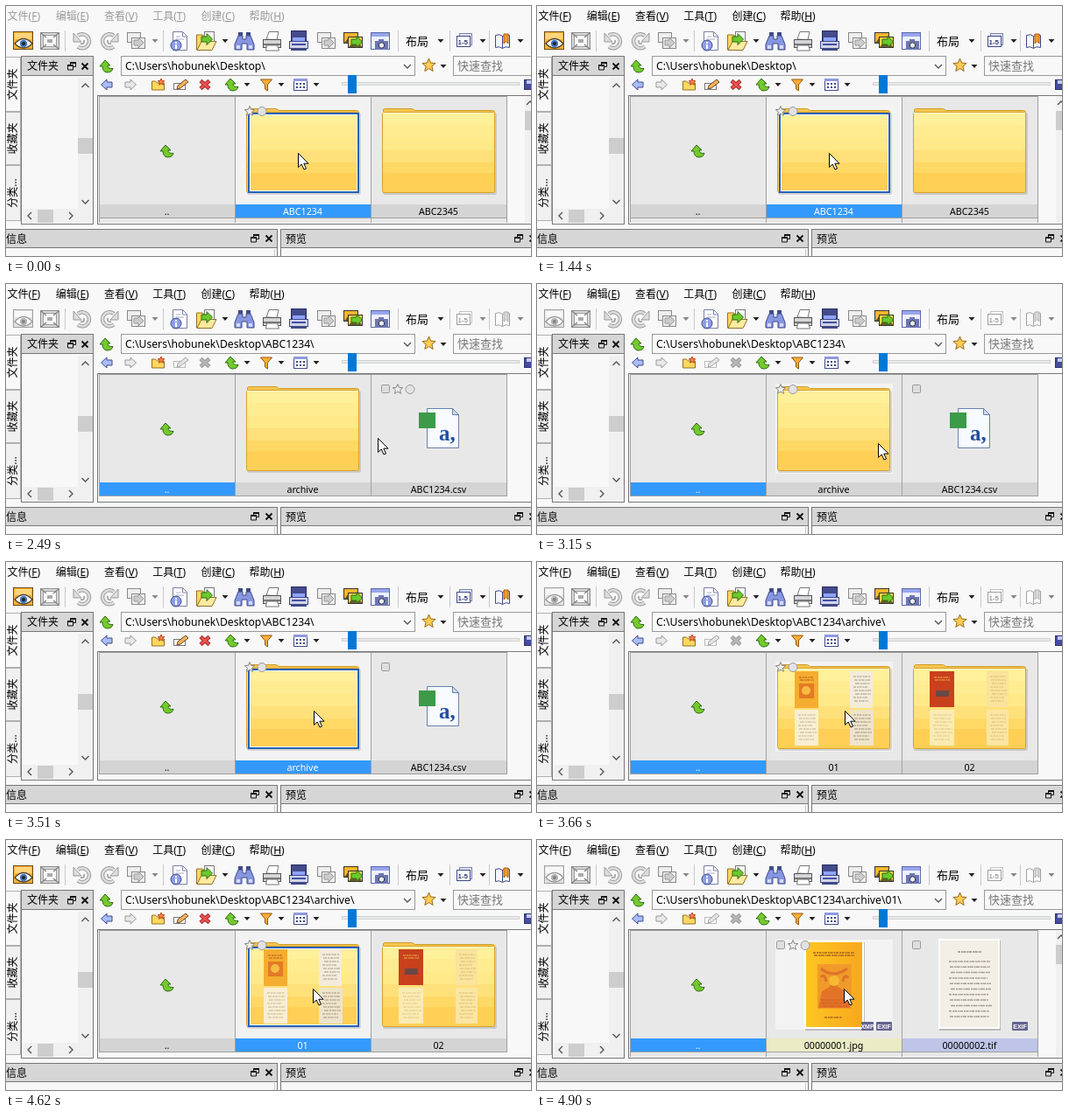
An HTML page for the animation above (6120 ms loop, 599x286 px).

```html
<!DOCTYPE html>
<html lang="zh">
<head>
<meta charset="utf-8">
<style>
html, body { margin: 0; width: 100%; height: 100%; overflow: hidden; background: #f8f8f8; }
svg { display: block; }
text { font: 12px "Noto Sans", "Noto Sans CJK SC", "Noto Sans CJK", sans-serif; white-space: pre; }
.path { font-size: 12.2px; }
.label { font-size: 10.7px; text-anchor: middle; }
.big { font-size: 13px; }
.badge { font: bold 7px "Liberation Sans", sans-serif; text-anchor: middle; fill: #fff; }
.off { filter: grayscale(1) brightness(1.15); opacity: .55; }
</style>
</head>
<body>
<svg id="stage" width="599" height="286" viewBox="0 0 599 286"></svg>
<script>
const LOOP = 6120;
const PALE = '#f8f8f8', HEADER = '#d6d6d6', BORDER = '#777', INK = '#3f4a86';
const stage = document.getElementById('stage');

const rect = (x, y, w, h, fill, more = '') =>
  `<rect x="${x}" y="${y}" width="${w}" height="${h}" fill="${fill}" ${more}/>`;
const box = (x, y, w, h, fill, line) =>
  rect(x + .5, y + .5, w - 1, h - 1, fill, `stroke="${line}"`);
const shape = (d, fill, line = 'none', width = 1) =>
  `<path d="${d}" fill="${fill}" stroke="${line}" stroke-width="${width}"/>`;
const stroke = (d, color, width = 1) => shape(d, 'none', color, width);
const dot = (x, y, r, fill, line = 'none', width = 1) =>
  `<circle cx="${x}" cy="${y}" r="${r}" fill="${fill}" stroke="${line}" stroke-width="${width}"/>`;
const text = (x, y, s, fill = '#000', cls = '') =>
  `<text x="${x}" y="${y}" fill="${fill}" class="${cls}">${s}</text>`;
const at = (x, y, s) => `<g transform="translate(${x} ${y})">${s}</g>`;
const when = (on, s) => on ? s : `<g class="off">${s}</g>`;

const drop = (x, y) => shape(`M${x - 3.5} ${y - 2}h7l-3.5 4z`, '#222');
const chevron = (x, y, turn, color = '#555') =>
  `<path d="M-4 -2L0 2L4 -2" transform="translate(${x} ${y}) rotate(${turn})" fill="none" stroke="${color}" stroke-width="1.4"/>`;
const restore = (x, y) =>
  stroke(`M${x - 1.5} ${y - 1.5}v-3h6v5h-3`, '#111') + stroke(`M${x - 4.5} ${y - 1}h6v5h-6z`, '#111') +
  stroke(`M${x - 2} ${y - 4}h7M${x - 5} ${y - 1}h7`, '#111', 2);
const close = (x, y) => stroke(`M${x - 3.5} ${y - 3.5}l7 7m0 -7l-7 7`, '#111', 1.8);
const separator = x => rect(x, 28, 1, 24, '#c8c8c8');
const upArrow = (x, y) => at(x, y,
  shape('M-8 0L-2 -7L4 -1H1Q1 3 7 2.500Q6 7 0 7Q-5 6 -5 0Z', '#74c92b', '#2b6b14'));
const star = (x, y, r, fill, line) => {
  const points = Array.from({ length: 10 }, (_, i) => {
    const a = i * Math.PI / 5, d = i % 2 ? r * .45 : r;
    return `${(x + d * Math.sin(a)).toFixed(2)} ${(y - d * Math.cos(a)).toFixed(2)}`;
  });
  return shape(`M${points.join('L')}Z`, fill, line);
};
const greenTip = (x, y) => shape(`M${x} ${y}h6v-3.500l6.500 6.500l-6.500 6.500v-3.500h-6z`, '#6bc92c', '#2d6a14');
const photo = (x, y, w, h, fill = '#f8b62a') =>
  box(x, y, w, h, fill, '#343434') + shape(`M${x + 1} ${y + h - 1}l5 -6l4 4l3 -3l${w - 14} 5z`, '#6d5a2a');
const exportPhoto = (x, y) => photo(x, y, 17, 13) + photo(x + 5, y + 5, 17, 13, '#ffd84c') + greenTip(x + 9, y + 8);
const outlinedPhoto = (x, y) => box(x, y, 16, 12, '#eee', '#888') + box(x + 5, y + 6, 16, 13, '#eee', '#888') +
  shape(`M${x + 8} ${y + 9}h5v-3l6 6l-6 6v-3h-5z`, '#ccc', '#999');

function toolbar(active) {
  const viewer = box(8, 29, 23, 21, '#f8b333', '#6e4a1a') + rect(10, 31, 19, 7, '#ffd47a') +
    shape('M10 43q10 -11 20 0q-10 10 -20 0z', '#fff', '#4f4030', 1.3) + dot(20, 43, 4.2, '#4173bd') + dot(20, 43, 2, '#222');
  const fullscreen = box(39, 30, 22, 20, '#d8d8d8', '#8c8c8c') + box(42, 33, 16, 14, '#fafafa', '#9b9b9b') +
    stroke('M40 31l6 5m14 -5l-6 5m-14 13l6 -5m14 5l-6 -5', '#858585', 1.5) + rect(47, 38, 6, 4, '#aaa');
  const rotate = (x, flip) => `<g transform="translate(${x} 40) scale(${flip} 1)">` +
    stroke('M-5 -6A8 8 0 1 1 -5 6.500', '#9a9a9a', 4.5) + stroke('M-5 -6A8 8 0 1 1 -5 6.500', '#ddd', 2.5) +
    shape('M-10 -9v10h9z', '#ddd', '#9a9a9a') + stroke('M-2 3q5 1 4 -4', '#aaa', 2) + '</g>';
  const info = shape('M190.500 29.500h11l5 5v16h-16z', '#fff', '#7980a5') + stroke('M201.500 30v5h5', '#7980a5') +
    stroke('M194 35h5m-5 3h9', '#a5aac6') + dot(194, 45, 6, '#8d9dea', INK) + rect(193, 44, 2, 5, '#fff') + rect(193, 41, 2, 2, '#fff');
  const open = box(226, 29, 12, 15, '#fff', '#777') + shape('M217.500 50V33h7l2 3h5v14z', '#ffd75e', '#91702a') +
    shape('M218 50.500l5 -10h17l-5 10z', '#ffeaa0', '#91702a') + greenTip(223, 35);
  const binoculars = shape('M265 34h5v4h4v-4h5l4 10v6h-8v-7h-6v7h-8v-6z', '#8796e2', INK) +
    rect(265, 30, 5, 4, INK) + rect(274, 30, 5, 4, INK) + rect(263, 45, 4, 4, '#d4daff') + rect(277, 45, 4, 4, '#d4daff');
  const printer = at(292, 29, shape('M5 9L8 .5h11l-2 9z', '#fff', '#777') + box(1, 9, 21, 10, '#d5d5da', '#555') +
    rect(2, 14, 19, 2, '#777') + shape('M5.500 16h12l2 6h-15z', '#fff', '#777'));
  const scanner = at(323, 28, box(2, 0, 18, 12, '#444b8c', '#282d60') + rect(4, 8, 14, 4, '#8fa4ff') +
    box(0, 12, 22, 9, '#d3d4e5', INK) + rect(3, 15, 16, 2, '#4150a8') + rect(2, 21, 18, 2, INK));
  const screenshot = box(416, 30, 22, 20, '#eef0ff', '#5b66a8') + rect(417, 31, 20, 4, '#98a6ed') +
    rect(421, 40, 15, 10, '#6c76b5') + rect(425, 38, 6, 3, '#6c76b5') + dot(428.5, 45, 3.2, '#e8edff', '#333');
  const rating = box(517, 31, 15, 14, '#e0e4f5', '#7b83a8') + box(514, 34, 16, 13, '#fff', INK) +
    `<text x="515.500" y="43.500" style="font:bold 8px 'Liberation Sans',sans-serif" fill="#333d70">1-5</text>`;
  const bookmark = shape('M558.500 33.500q5 -2 8 1q4 -3 8 -1v14q-5 -2 -8 1q-4 -3 -8 -1z', '#f4f5ff', INK) +
    stroke('M566.500 34v14', INK) + shape('M568 32h5v11l-2.500 -2.500l-2.500 2.500z', '#f79a28', '#a85c12');
  return when(active, viewer) + fullscreen + separator(67) + rotate(87, 1) + rotate(118, -1) +
    outlinedPhoto(138, 30) + when(false, drop(170, 40)) + separator(179) +
    info + open + drop(250, 40) + binoculars + printer + scanner + outlinedPhoto(355, 30) + exportPhoto(385, 30) + screenshot +
    separator(447) + text(456, 44.5, '布局', '#000', 'big') + drop(496, 40) + separator(506) +
    when(active, rating + drop(544, 40) + bookmark + drop(587, 40)) + separator(551);
}

function browserBar(path, active) {
  const arrow = (x, flip, fill, line) => `<g transform="translate(${x} 90) scale(${flip} 1)">` +
    shape('M-6.500 0L0 -6v3h6v6h-6v3z', fill, line) + '</g>';
  const newFolder = shape('M166.500 96V86h4l2 2h8v8z', '#ffd75e', '#91702a') + star(177, 87, 4, '#ff8548', '#b9411c');
  const rename = box(191, 88, 14, 8, '#fff', '#777') + shape('M195 95l1 -4l9 -7l3 3l-9 7z', '#f2b25a', '#6b4a2a');
  const remove = stroke('M222 85.500l10 9m0 -9l-10 9', '#9c2a2a', 4.5) + stroke('M222.500 86l9 8m0 -8l-9 8', '#f0504c', 2.5);
  const grid = box(328, 83, 16, 14, '#fff', INK) + rect(328, 83, 16, 3, '#8d98dc') +
    [0, 4].map(y => [0, 4, 8].map(x => rect(331 + x, 88 + y, 2, 2, INK)).join('')).join('');
  return upArrow(115, 69) + box(131, 57, 336, 23, PALE, '#999') + text(136, 73, path, '#000', 'path') +
    chevron(458, 69, 0) + star(482.5, 68, 8, '#ffcb52', '#96691c') + drop(499, 69) +
    box(510, 57, 95, 23, PALE, '#999') + text(515, 73, '快速查找', '#777', 'big') +
    arrow(115, 1, '#a9bdff', INK) + arrow(142, -1, '#e8e8e8', '#999') + newFolder + when(active, rename + remove) +
    upArrow(258, 90) + drop(275, 90) + shape('M290.500 84h13l-5 6v7l-3 -2v-5z', '#ffae35', '#93560e') + drop(314, 90) +
    grid + drop(354, 90) + box(383, 87, 203, 4, '#e7eaea', '#d2d2d2') + rect(390, 79, 10, 21, '#0078d7') +
    box(591, 84, 12, 12, '#464c9f', '#2c3170') + rect(594, 85, 5, 4, '#c5caf3');
}

function chrome() {
  const tab = (y, h, s, fill) => box(-1, y, 18, h, fill, '#b0b0b0') +
    `<text transform="translate(11.500 ${y + h / 2}) rotate(-90)" text-anchor="middle">${s}</text>`;
  const panel = (x, w, title) => box(x, 255, w, 40, PALE, BORDER) + rect(x + 1, 256, w - 2, 20, HEADER) +
    rect(x, 276, w, 1, BORDER) + text(Math.max(0, x + 6), 271, title);
  return rect(0, 0, 599, 286, PALE) +
    tab(58, 63, '文件夹', PALE) + tab(121, 61, '收藏夹', '#f0f0f0') + tab(182, 64, '分类...', '#f0f0f0') +
    box(17, 57, 83, 193, PALE, BORDER) + rect(18, 58, 81, 21, HEADER) + rect(18, 79, 81, 1, BORDER) +
    text(24, 73, '文件夹') + restore(75, 69) + close(90, 69) +
    rect(82, 82, 17, 150, '#f0f0f0') + rect(82, 151, 17, 18, '#cdcdcd') + chevron(90.5, 91, 180) + chevron(90.5, 224, 0) +
    rect(20, 232, 79, 16, '#f0f0f0') + rect(36, 233, 18, 15, '#cdcdcd') + chevron(27, 240, 90) + chevron(74, 240, -90) +
    box(104, 102, 500, 148, PALE, BORDER) + panel(-6, 316, '信息') + rect(306, 278, 1, 8, '#c5c5c5') +
    panel(313, 300, '预览') + restore(284, 266) + close(300, 266) + restore(585, 266) + close(601, 266);
}

function menu(color) {
  return ['文件F', '编辑E', '查看V', '工具T', '创建C', '帮助H'].map((s, i) =>
    text(1.6 + i * 55.2, 16, `${s.slice(0, 2)}(<tspan text-decoration="underline">${s[2]}</tspan>)`, color)).join('');
}

// Thumbnails are drawn relative to the left edge of their cell.
const rows = (x, y, w, n, gap, color, width = 1) => Array.from({ length: n }, (_, i) =>
  stroke(`M${x + i * 7 % 3} ${y + i * gap}h${w - i * 5 % 4}`, color, width)
    .replace('/>', ` stroke-dasharray="${3 + i % 3} 1 2 .5"/>`)).join('');

function folder() {
  const bands = [[121, 15, '#fff09a'], [136, 15, '#ffec90'], [151, 14, '#ffe988'],
    [165, 14, '#ffe07a'], [179, 12, '#ffd866'], [191, 22, '#ffcf56']];
  return rect(14, 122, 130, 94, '#000', 'opacity=".13" rx="2"') +
    shape('M14.500 122v-3q0 -1.500 2 -1.500h31l3 2h88q3 0 3 2v2z', '#f5c64e', '#cf9c28') +
    bands.map(([y, h, c]) => rect(14, y, 127, h, c)).join('') +
    rect(13.5, 121.5, 128, 92, 'none', 'rx="2" stroke="#d5a22d"') + rect(14, 122, 127, 1, '#fff7c6');
}
const page = (x, y, w, h, fill, ink) => rect(x, y, w, h, fill) + rows(x + 4, y + 6, w - 7, 8, 4, ink, .8);
const folder01 = () => folder() +
  rect(33, 125, 27, 42, '#f5ad30') + rect(38, 139, 17, 17, '#e47a25') + dot(46, 147, 5, '#f6bd45') +
  rows(38, 132, 17, 2, 3, '#b25b1a') + page(96, 125, 26, 42, '#f4ecda', '#8b8375') +
  page(33, 169, 27, 41, '#f8eed2', '#b1a58a') + page(96, 169, 27, 41, '#eee4ca', '#8b806c');
const folder02 = () => folder() +
  rect(32, 125, 28, 41, '#c9401c') + rows(37, 132, 18, 2, 3, '#eeb64a') + rect(39, 147, 15, 7, '#6a4844') +
  page(97, 125, 25, 41, '#fae39b', '#d4b36a') + page(32, 169, 28, 41, '#faebb4', '#d9bc77') +
  page(97, 169, 25, 41, '#fae6a2', '#d3b26a');
const upFolder = () => upArrow(78, 166);
const checkbox = () => rect(12.5, 115.5, 9, 9, '#dedede', 'rx="1" stroke="#999"');
const csv = () => checkbox() + shape('M64.500 142.500h29l7 7v38h-36z', '#f7faff', '#6781aa') +
  shape('M93.500 142.500v7h7z', '#cfdcf0', '#6781aa') + rect(55, 147, 19, 18, '#3b9b48') +
  `<text x="78" y="179" style="font:bold 25px 'Liberation Serif',serif" fill="#234f9e">a,</text>`;
const badge = (x, w, s) => rect(x, 208, w, 10, '#62648e', 'rx="1"') + text(x + w / 2, 215.7, s, '#fff', 'badge');
const paper = (x, y, w, h, fill) => rect(x + 1, y + 2, w, h, '#0003') + rect(x, y, w, h, '#fff') +
  rect(x + 2, y + 2, w - 4, h - 4, fill);
const cover = () => checkbox() +
  '<linearGradient id="cover"><stop stop-color="#fdc622"/><stop offset="1" stop-color="#f8a81d"/></linearGradient>' +
  paper(44, 115, 68, 101, 'url(#cover)') + rows(54, 129, 47, 2, 3, '#a8641c', 1.5) +
  rect(59, 142, 39, 51, '#f19a2b') + shape('M60 192l4 -19l9 -5l4 -13l5 13l10 5l4 19z', '#e27428') +
  stroke('M63 147q14 12 30 0M63 157q4 -5 6 5m19 0q2 -10 6 -4', '#df7329', 3) + dot(78, 161, 6, '#f7b934') +
  rows(63, 183, 31, 3, 3.5, '#d86025', 1.5) + rows(67, 203, 20, 1, 3, '#a8641c', 1.5) +
  badge(109, 14, 'XMP') + badge(126, 18, 'EXIF');
const contents = () => checkbox() + paper(42, 113, 70, 103, '#f3eee6') +
  rows(64, 128, 27, 1, 3, '#928b82', 1.4) + rows(54, 139, 47, 11, 6.3, '#a39c92', 1.5) + badge(126, 18, 'EXIF');

const desktop = 'C:\\Users\\hobunek\\Desktop\\';
const places = {
  desktop: { path: desktop, scroll: true, items: [['..', upFolder], ['ABC1234', folder], ['ABC2345', folder]] },
  project: { path: desktop + 'ABC1234\\', items: [['..', upFolder], ['archive', folder], ['ABC1234.csv', csv]] },
  archive: { path: desktop + 'ABC1234\\archive\\', items: [['..', upFolder], ['01', folder01], ['02', folder02]] },
  images: { path: desktop + 'ABC1234\\archive\\01\\', scroll: true,
    items: [['..', upFolder], ['00000001.jpg', cover, '#ebebc6'], ['00000002.tif', contents, '#bec5e8']] }
};

function cell([name, thumb, tint = '#d4d4d4'], i, selected, hovered) {
  const isFile = thumb === csv || thumb === cover;
  const mark = isFile ? 31 : 17;
  const chosen = selected && i > 0;
  let s = rect(0, 103, 156, 140, chosen ? '#f2f2f2' : '#e8e8e8') + rect(0, 227, 156, 15, selected ? '#3399ff' : tint);
  if (hovered && thumb !== csv) s += rect(11, 114, 134, 103, '#f3f3f3');
  s += thumb();
  if (chosen) s += rect(16, 123, 125, 90, 'none', 'stroke="#2860b8" stroke-width="2"') +
    rect(17.5, 124.5, 122, 87, 'none', 'stroke="#fff"');
  if (hovered) s += star(mark, 120.5, 6, '#eee', '#888') + dot(mark + 14, 120.5, 5, '#e2e2e2', '#999');
  s += text(77.5, 238.5, name, selected ? '#fff' : '#000', 'label') + box(0, 103, 156, 140, 'none', '#a0a0a0');
  return at(106 + i * 155, 0, s);
}

function browser({ items, scroll }, selected, x) {
  const hovered = x < 416 ? 1 : 2;
  let s = items.map((item, i) => cell(item, i, i === selected, i === hovered)).join('');
  if (scroll) {
    s += rect(106, 243, 466, 5, '#e8e8e8') + [106, 261, 416, 571].map(c => rect(c, 243, 1, 5, '#a0a0a0')).join('') +
      rect(592, 103, 7, 145, '#f0f0f0') + rect(592, 120, 7, 22, '#cdcdcd') + chevron(598, 111, 180);
  }
  return s;
}

const pointer = (x, y) => at(x + .5, y + .5, shape('M0 0V16L3.700 12.500L6.500 18.500L9 17.500L6.300 11.700H11.500Z', '#fff', '#000'));

// start time, place, selected cell, pointer x, pointer y
const steps = [
  [0, 'desktop', 1, 333, 168],
  [1440, 'desktop', 1, 333, 168],
  [1710, 'project', 0, 333, 168],
  [2490, 'project', 0, 424, 176],
  [2620, 'project', 0, 504, 182],
  [2760, 'project', 0, 517, 185],
  [2880, 'project', 0, 421, 171],
  [3030, 'project', 0, 398, 180],
  [3150, 'project', 0, 389, 182],
  [3270, 'project', 0, 364, 176],
  [3390, 'project', 0, 351, 170],
  [3510, 'project', 1, 351, 170],
  [3660, 'archive', 0, 351, 170],
  [4220, 'archive', 0, 350, 170],
  [4620, 'archive', 1, 350, 170],
  [4900, 'images', 0, 350, 170]
];

const frame = chrome();
let start, shown;

function draw(now) {
  start ??= now;
  const t = (now - start) % LOOP;
  const step = steps.findLast(s => s[0] <= t);
  if (step !== shown) {
    shown = step;
    const [time, name, selected, x, y] = step;
    const place = places[name], active = selected > 0;
    stage.innerHTML = frame + menu(time < 1440 ? '#9a9a9a' : '#000') + toolbar(active) +
      browserBar(place.path, active) + browser(place, selected, x) + pointer(x, y);
  }
  requestAnimationFrame(draw);
}
requestAnimationFrame(draw);
</script>
</body>
</html>
```
